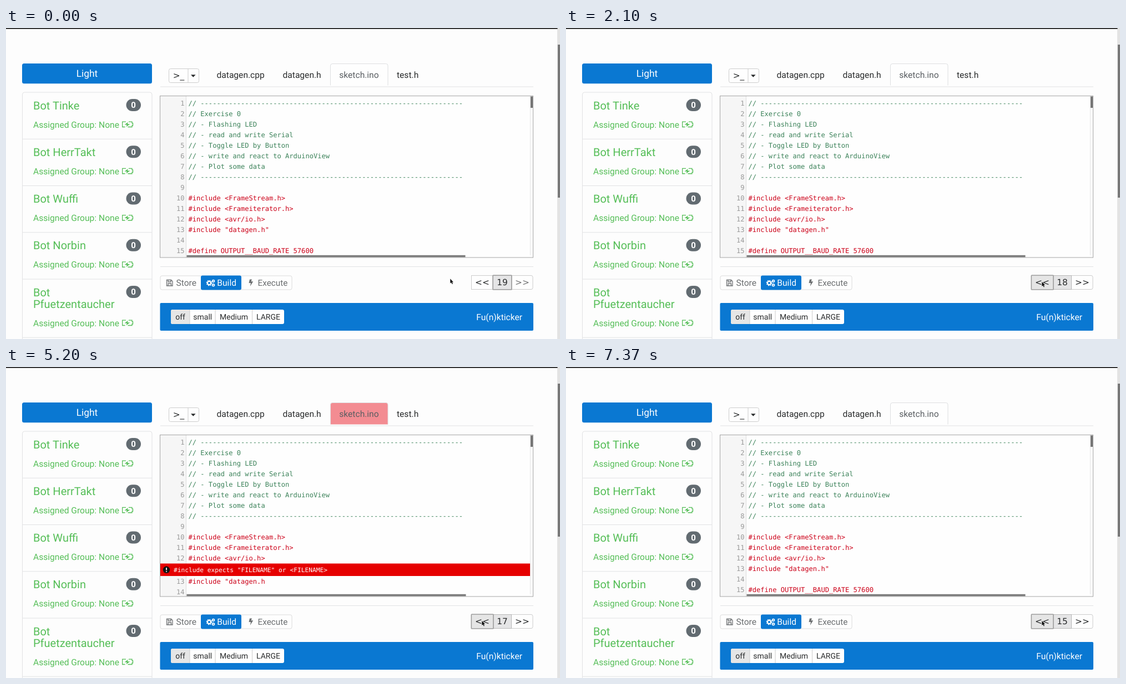
An HTML page for the animation above (8 s loop, 998x561 px).

```html
<!DOCTYPE html>
<html lang="en">
<head>
<meta charset="utf-8">
<title>Robot lab editor</title>
<style>
html, body { margin: 0; width: 100%; height: 100%; overflow: hidden; background: #fdfdfd; }
svg { display: block; width: 100vw; height: 100vh; }
text { font-family: Roboto, sans-serif; font-size: 15.6px; fill: #292b2c; white-space: pre; text-rendering: geometricPrecision; }
.btn { font-family: "DejaVu Sans", sans-serif; font-size: 15.4px; text-anchor: middle; }
.code text { font-family: "DejaVu Sans Mono", monospace; font-size: 12.08px; }
.code .num { fill: #999; text-anchor: end; }
.code .note { fill: #3b8259; }
.code .pre { fill: #cc0018; }
.code .msg { fill: #fff; font-size: 11.22px; }
.green { fill: #55be57; }
.title { font-size: 20px; }
.mid { text-anchor: middle; }
.white { fill: #fff; }
.small { font-size: 14px; }
.count { fill: #fff; font-size: 15px; font-weight: 700; text-anchor: middle; }
.muted { fill: #6c6f71; }
.line { fill: none; stroke: #e1e2e4; }
.edge { fill: #fefefe; stroke: #ccc; }
.blue { fill: #0a78d2; }
</style>
</head>
<body>
<svg viewBox="0 0 998 561" preserveAspectRatio="none">
  <defs>
    <clipPath id="view"><rect x="278" y="123" width="667" height="287"/></clipPath>
  </defs>
  <rect width="998" height="561" fill="#fdfdfd"/>
  <rect x="993" width="5" height="561" fill="#e3e3e3"/>
  <rect x="994" y="30" width="4" height="276" fill="#777"/>
  <rect width="993.5" height="1.6" fill="#080808"/>

  <rect class="blue" x="29" y="64" width="234" height="36.3" rx="3.5"/>
  <text class="mid white" x="146" y="88" style="font-size:17.4px">Light</text>
  <path class="line" d="M29.5 561V120q0-4 4-4H259q4 0 4 4V561"/>
  <g id="bots"></g>

  <path class="line" d="M278 106H950M278 430.5H950"/>
  <g id="active">
    <path id="tab" d="M584.5 103.5V68q0-3.5 3.5-3.5H684.500q3.500 0 3.500 3.500V103.500" stroke="#dedfe1"/>
  </g>
  <rect class="edge" x="293.500" y="73.500" width="54" height="25" rx="3"/>
  <path d="M328 73.500V98.500" stroke="#ccc"/>
  <text class="btn" x="311" y="91">&gt;_</text>
  <path d="M333 84.300h8.600l-4.300 4.500z" fill="#292b2c"/>
  <text x="379.500" y="90.400">datagen.cpp</text>
  <text x="498.500" y="90.400">datagen.h</text>
  <text x="600.300" y="90.400" style="fill:#5a5e62">sketch.ino</text>
  <text id="test" x="704" y="90.400">test.h</text>

  <rect x="277.500" y="122.500" width="672" height="291.500" fill="#fefefe"/>
  <rect x="278" y="123" width="46.500" height="291" fill="#f6f6f6"/>
  <path d="M324.500 123V414" stroke="#ddd"/>
  <g class="code" clip-path="url(#view)">
    <g id="fine"></g>
    <g id="broken">
      <g id="brokenLines"></g>
      <rect x="278" y="354.500" width="667" height="22.500" fill="#e60000"/>
      <circle cx="289" cy="365.800" r="6.200" fill="#101010"/>
      <path d="M289 362v4.600M289 368v1.800" stroke="#fff" stroke-width="1.800"/>
      <text class="msg" x="302" y="370">#include expects "FILENAME" or &lt;FILENAME&gt;</text>
    </g>
  </g>
  <path d="M944.500 123V410" stroke="#e4e4e4"/>
  <rect x="945" y="123.500" width="4" height="20.500" fill="#757575"/>
  <rect id="thumb" x="325.500" y="409.800" height="3.700" fill="#7b7b7b"/>
  <rect x="277.500" y="122.500" width="672" height="291.500" fill="none" stroke="#a5a5a5"/>

  <rect class="edge" x="278" y="447" width="237" height="25" rx="3" style="stroke:#dcdcdc"/>
  <rect class="blue" x="351" y="446.500" width="73" height="26" rx="3"/>
  <g fill="none" stroke="#6c6f71" stroke-width="1.300">
    <path d="M289.500 454.500h8l2.500 2.500v8h-10.500zM292 454.500v3.500h5v-3.500M292 465v-4h5.500v4"/>
  </g>
  <text class="muted" x="306.500" y="465.200">Store</text>
  <g fill="none" stroke="#fff">
    <circle cx="366" cy="460" r="3.100" stroke-width="2.200"/>
    <circle cx="366" cy="460" r="4.700" stroke-width="1.400" stroke-dasharray="1.850 1.840"/>
    <circle cx="373.500" cy="456.500" r="1.900" stroke-width="1.700"/>
    <circle cx="373.500" cy="463.800" r="1.900" stroke-width="1.700"/>
  </g>
  <text class="white" x="380.300" y="465.200">Build</text>
  <path class="muted" d="M439 453.500h4l-1.500 3.800h3.700l-5.400 8.700 1.200-5.900h-3.500z"/>
  <text class="muted" x="453.500" y="465.200" style="font-size:15.300px">Execute</text>

  <g id="pager">
    <rect class="edge" x="838.500" y="446.500" width="110.500" height="25" rx="3"/>
    <rect x="877.500" y="446.500" width="33" height="25" fill="#e5e5e6" stroke="#b8b8b8"/>
    <rect id="back" x="838.500" y="446.500" width="39" height="25" stroke="#ccc"/>
    <rect id="focus" y="446" height="26" rx="1" fill="none" stroke="#8e8e8e" stroke-opacity=".75" stroke-width="1.700"/>
    <text class="btn" x="858" y="463.500">&lt;&lt;</text>
    <text class="btn" id="page" x="894" y="463.800"></text>
    <text class="btn" id="next" x="930" y="463.500">&gt;&gt;</text>
  </g>

  <rect class="blue" x="277.500" y="496" width="672.500" height="50" rx="2"/>
  <rect x="297" y="508" width="204" height="26" rx="3" fill="#fff"/>
  <path d="M300 508h31v26h-31q-3 0-3-3v-20q0-3 3-3z" fill="#e6e6e6"/>
  <path d="M331 508v26M377 508v26M443.500 508v26" stroke="#ccc"/>
  <g class="mid">
    <text class="small" x="314" y="526.400">off</text>
    <text class="small" x="354.300" y="526.400">small</text>
    <text class="small" x="410.500" y="526.400">Medium</text>
    <text class="small" x="472.500" y="526.400">LARGE</text>
  </g>
  <text class="white" x="930" y="526.800" text-anchor="end">Fu(n)kticker</text>

  <path id="mouse" d="M0 0V8.300L1.900 6.600 3.300 9.800 4.700 9.200 3.300 6.100H5.700Z" fill="#111" stroke="#fff" stroke-width=".7" paint-order="stroke"/>
</svg>
<script>
const LOOP = 8000;
const $ = id => document.getElementById(id);
const esc = s => s.replace(/&/g, "&amp;").replace(/</g, "&lt;");
const label = (cls, x, y, s) => `<text class="${cls}" x="${x}" y="${y}">${esc(s)}</text>`;

function botRow(name, i) {
  const top = 116 + i * 84.25, parts = name.split("\n");
  const drop = (parts.length - 1) * 21;
  const y = top + 63.5 + drop, end = top + 84.25 + drop;
  return parts.map((p, k) => label("green title", 49, top + 30.6 + k * 21, p)).join("") +
    label("green", 49, y, "Assigned Group: None") +
    `<g transform="translate(209 ${y - 11})">
      <path d="M7 .7H.7V10H5.500M12 .7H18V3.200H19.500V7.500H18V10H10.500" fill="none" stroke="#55be57" stroke-width="1.300"/>
      <path class="green" d="M10.800 1.200L4.500 6h4.300l-1.300 3.800L14.400 4.700h-4.500z"/>
    </g>
    <rect x="216.500" y="${top + 12}" width="26.500" height="22" rx="11" fill="#626b71"/>` +
    label("count", 229.5, top + 28.4, "0") +
    `<path class="line" d="M29.500 ${end}H263"/>`;
}
$("bots").innerHTML = ["Bot Tinke", "Bot HerrTakt", "Bot Wuffi", "Bot Norbin", "Bot\nPfuetzentaucher"].map(botRow).join("");

const rule = "// " + "-".repeat(65);
const lines = [
  rule, "// Exercise 0", "// - Flashing LED", "// - read and write Serial",
  "// - Toggle LED by Button", "// - write and react to ArduinoView", "// - Plot some data", rule, "",
  "#include <FrameStream.h>", "#include <Frameiterator.h>", "#include <avr/io.h>",
  '#include "datagen.h"', "", "#define OUTPUT__BAUD_RATE 57600"
];
function listing(src, gapAt, gap) {
  return src.map((s, i) => {
    const y = 140.3 + i * 19 + (i >= gapAt ? gap : 0);
    return label("num", 321.5, y, String(i + 1)) + label(s[0] === "/" ? "note" : "pre", 328.5, y, s);
  }).join("");
}
$("fine").innerHTML = listing(lines, 99, 0);
$("brokenLines").innerHTML = listing(lines.map((s, i) => i === 12 ? s.slice(0, -1) : s), 12, 22.5);

const clamp = v => Math.max(0, Math.min(1, v));
const ease = (t, a, b) => { const k = clamp((t - a) / (b - a)); return k * k * (3 - 2 * k); };

// page number, time it loads, span in which the hovered button darkens again
const pages = [
  { n: 19, at: 0, fade: [830, 980] },
  { n: 18, at: 1900, fade: [1930, 2100] },
  { n: 17, at: 3500, fade: [3530, 3700] },
  { n: 16, at: 5600, fade: [5769, 5770] },
  { n: 15, at: 7200, fade: [7220, 7360] }
];

function draw(t) {
  const page = pages.filter(p => p.at <= t).pop();
  const failed = page.n === 17, pressed = t >= 1630;

  $("page").textContent = page.n;
  $("next").style.opacity = page.n === 19 ? 0.65 : 1;
  const shade = Math.round(254 - 25 * ease(t, ...page.fade));
  $("back").setAttribute("fill", `rgb(${shade},${shade},${shade})`);
  $("focus").setAttribute("x", pressed ? 838.3 : 877);
  $("focus").setAttribute("width", pressed ? 39.7 : 34);

  $("tab").setAttribute("fill", failed ? "#f38c92" : "#fefefe");
  $("test").style.display = page.n === 15 ? "none" : "";
  $("fine").style.display = failed ? "none" : "";
  $("broken").style.display = failed ? "" : "none";
  $("thumb").setAttribute("width", failed ? 503 : 502);

  const a = ease(t, 40, 230), b = ease(t, 780, 1000);
  $("mouse").setAttribute("transform", `translate(${800.3 + 18 * a + 39 * b} ${452.3 + 2 * a + 3.5 * b})`);
}

const start = performance.now();
function tick() {
  draw((performance.now() - start) % LOOP);
  requestAnimationFrame(tick);
}
tick();
</script>
</body>
</html>
```
